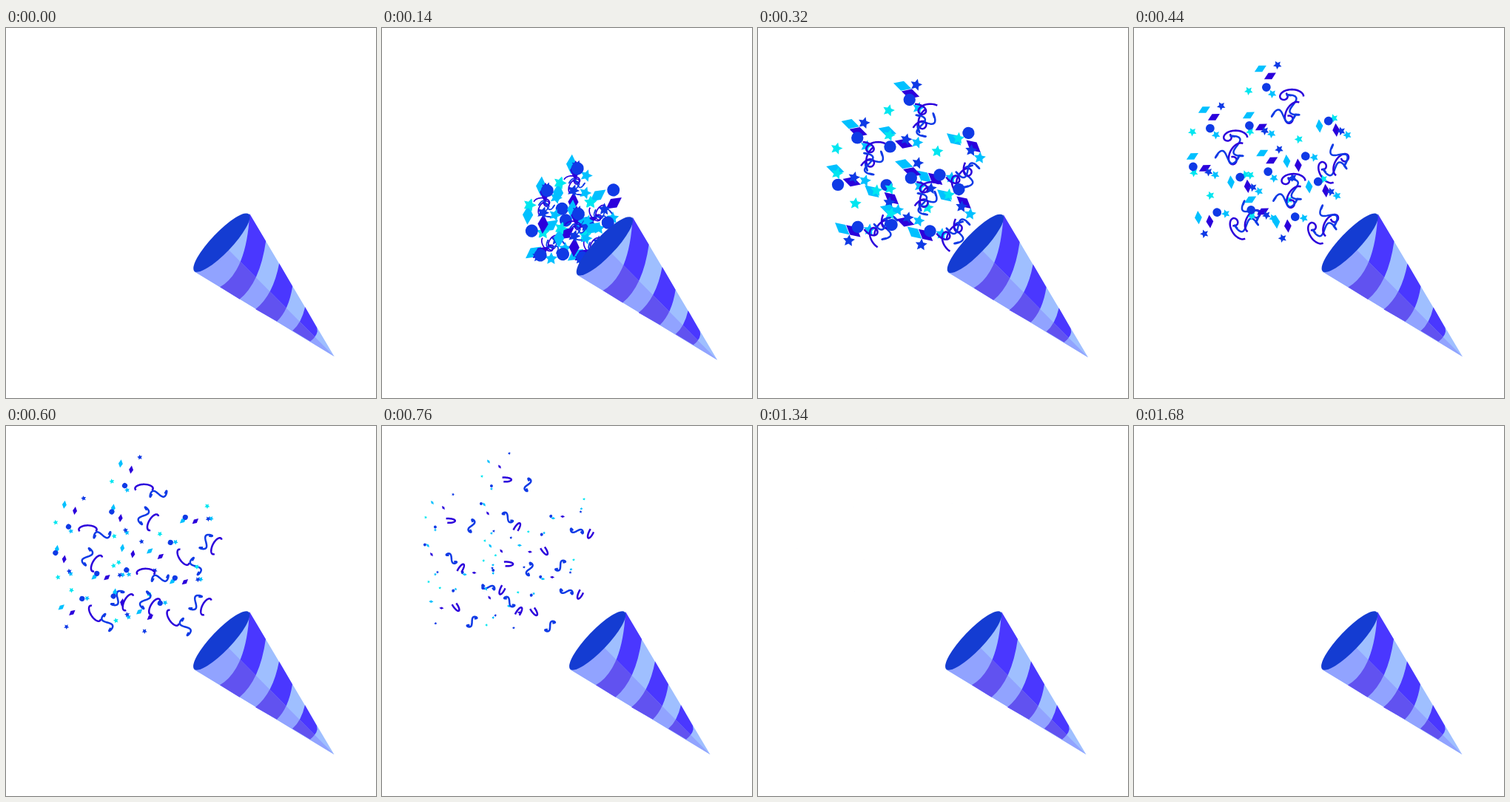
Animation of 500x500 px, one loop 1.82 s. Source, as an HTML page with a canvas:

```html
<!DOCTYPE html>
<html>
<head>
<meta charset="utf-8">
<style>
html, body { margin: 0; width: 100%; height: 100%; overflow: hidden; background: #fff; }
canvas { display: block; width: 500px; height: 500px; }
</style>
</head>
<body>
<canvas id="stage" width="500" height="500"></canvas>
<script>
const ctx = document.getElementById('stage').getContext('2d');
const LOOP = 1820, END = 1620, RIBBON_END = 1340;
const blue = '#0f3ae6', sky = '#00c0ff', teal = '#00e6f0', violet = '#2b00dc';
const { PI, cos, sin, pow, min, max } = Math;
const rad = PI / 180;
const origin = [300, 320];

// Easing shared by size and position of the small pieces
const fade = t => pow(1 - t / END, 3.4);
const turn = (t, from) => pow(1 - t / END, 2) - pow(1 - from / END, 2);
const mix = (a, b, f) => a + (b - a) * f;

const polygon = points => {
  const path = new Path2D();
  points.forEach(p => path.lineTo(...p));
  path.closePath();
  return path;
};
const diamond = polygon([[-1.37, .73], [-.4, -.73], [1.37, -.73], [.4, .73]]);
const star = polygon(Array.from({ length: 10 }, (_, i) => {
  const a = i * PI / 5 - .84, r = i % 2 ? .5 : 1.03;
  return [r * cos(a), r * sin(a)];
}));
const disc = new Path2D();
disc.arc(0, 0, 1, 0, 7);

// Shape, colour, place at 440 ms, place at 760 ms
const pieces = [
  [diamond, sky, [171, 55], [144, 48]],
  [diamond, sky, [155, 118], [138, 106]],
  [star, teal, [155, 85], [135, 68]],
  [star, teal, [157, 140], [139, 155]],
  [star, sky, [187, 89], [148, 85]],
  [star, sky, [186, 143], [148, 145]],
  [diamond, violet, [184, 65], [159, 55]],
  [diamond, violet, [172, 134], [143, 118]],
  [star, blue, [194, 50], [172, 37]],
  [star, blue, [177, 139], [151, 142]],
  [disc, blue, [179, 80], [148, 81]],
  [disc, blue, [156, 132], [134, 105]]
];

// Outlines for f in -1..1; life falls from 1 to 0
function arch(f, life, t) {
  const a = 10 * pow(life, .3), b = 7 * life * life;
  const middle = min(0, t - 760) * .56 * rad;
  const angle = middle + f * (100 + 100 * pow(life, 6)) * rad;
  return [
    12 * pow(life, 6) * f + a * (cos(angle) - cos(middle) / 2),
    b * (sin(angle) - sin(middle) / 2)
  ];
}
function curl(f, life) {
  return [
    13 * life * life * f + 7 * Math.sqrt(life) * sin(PI * f),
    6 * life * life * sin(2 * PI * f)
  ];
}

// Outline, colour, tilt, spin, place at 440 ms, place at 1080 ms
const ribbons = [
  [arch, violet, 0, 0, [203, 90], [138, 55]],
  [curl, blue, 0, 600, [215, 104], [179, 55]],
  [arch, violet, -60, 0, [208, 122], [160, 148]],
  [curl, blue, -60, 600, [202, 119], [138, 128]]
];

// Offset from the origin, and whether mirrored
const bursts = [
  [199, -176, true], [79.5, -100, true], [185, -94, true],
  [0, 0], [-76, 55.5], [2.3, 114]
];
const mc = cos(57 * rad), ms = sin(57 * rad);

function drawBurst(t, spread) {
  const grow = min(1, spread / .8);
  const place = (from, to, f) => ctx.translate(
    ...[0, 1].map(i => spread * (mix(from[i], to[i], f) - origin[i])));

  const moved = (fade(440) - fade(t)) / (fade(440) - fade(760));
  const size = 17.3 * fade(t) * grow;
  for (const [path, color, from, to] of pieces) {
    ctx.save();
    place(from, to, moved);
    ctx.rotate(400 * turn(t, 440) * rad);
    ctx.scale(size, size);
    ctx.fillStyle = color;
    ctx.fill(path);
    ctx.restore();
  }

  const life = min(1, (RIBBON_END - t) / 900);
  if (life <= 0) return;
  ctx.lineWidth = 2.5 * grow;
  ctx.lineJoin = 'round';
  for (const [outline, color, tilt, spin, from, to] of ribbons) {
    ctx.save();
    place(from, to, (t - 440) / 640);
    ctx.rotate((tilt + spin * turn(t, 600)) * rad);
    ctx.strokeStyle = color;
    ctx.beginPath();
    for (let i = -20; i <= 20; i++) {
      const [x, y] = outline(i / 20, life, t);
      ctx.lineTo(x * grow, y * grow);
    }
    ctx.stroke();
    ctx.restore();
  }
}

const body = new Path2D('M329 251L443.5 444L254 329Z');
const shade = new Path2D('M291 290L443.5 444L254 329Z');
const stripes = new Path2D(
  'M329 251Q325 329 289 350L315.5 366.5Q343 344 351 288Z' +
  'M369 318Q361 361 337 380L366 396.5Q382 381 387 349Z' +
  'M404 377Q399 399 387 409L411 423.5Q423 414 420 405Z');
const mouth = new Path2D();
mouth.ellipse(291.2, 290, 53.3, 13.8, -46.3 * rad, 0, 7);

function fill(path, color) {
  ctx.fillStyle = color;
  ctx.fill(path);
}

function drawCone(t) {
  const kick = t < 100 ? sin(t / 200 * PI) : pow(max(0, 1 - (t - 100) / 460), 2.3);
  ctx.save();
  ctx.translate(12 * kick, 6 * kick);
  fill(body, '#9fbfff');
  fill(stripes, '#4a37ff');
  ctx.save();
  ctx.clip(shade);
  fill(body, '#91a3ff');
  fill(stripes, '#6152f0');
  ctx.restore();
  fill(mouth, '#143cd2');
  ctx.restore();
}

function draw(now) {
  const t = now % LOOP;
  ctx.clearRect(0, 0, 500, 500);
  if (t > 0 && t < END) {
    const spread = 1 - pow(max(0, 1 - t / 440), 2);
    for (const [x, y, mirrored] of bursts) {
      ctx.save();
      ctx.translate(origin[0] + spread * x, origin[1] + spread * y);
      if (mirrored) ctx.transform(mc, ms, ms, -mc, 0, 0);
      drawBurst(t, spread);
      ctx.restore();
    }
  }
  drawCone(t);
}

const start = performance.now();
function frame() {
  draw(performance.now() - start);
  requestAnimationFrame(frame);
}
draw(0);
requestAnimationFrame(frame);
</script>
</body>
</html>
```
